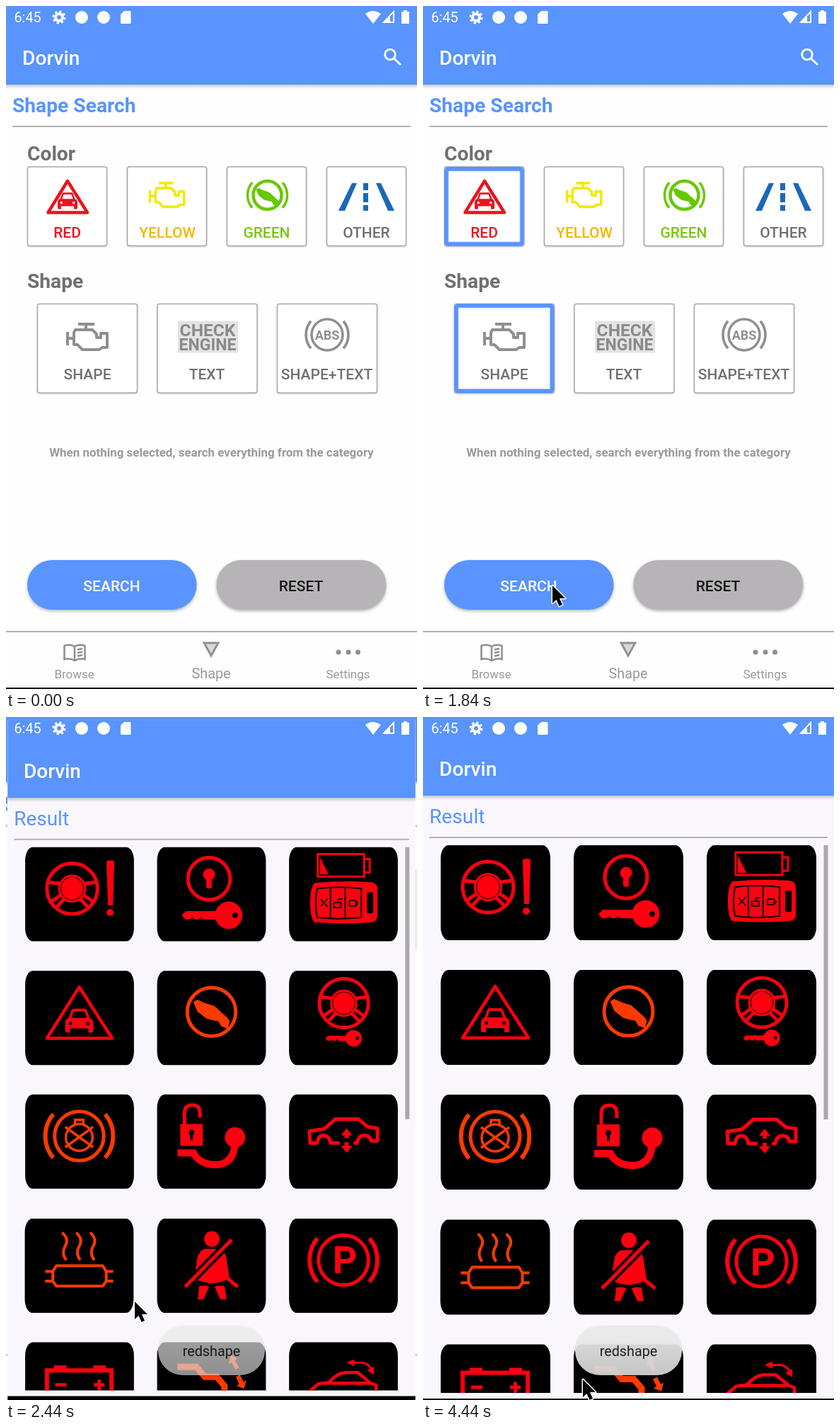
An HTML page that plays this animation: 581x964 px, repeating every 4.48 s.

```html
<!DOCTYPE html>
<html lang="en">
<head>
<meta charset="utf-8">
<title>Shape search</title>
<style>
html, body { margin: 0; width: 100%; height: 100%; overflow: hidden; background: #fefefe; }
svg { display: block; width: 581px; height: 964px; font-family: Roboto, sans-serif; }
.mid { text-anchor: middle; }
.h { font-size: 28.2px; }
.b { font-weight: 700; }
.label { font-size: 21px; font-weight: 500; text-anchor: middle; fill: #707070; }
.small { font-size: 16.94px; }
.line { fill: none; stroke: currentColor; }
.fill { fill: currentColor; }
.red { color: #fe0010; }
.orange { color: #ff3a00; }
.grey { color: #8f8f8f; }
.card { fill: #fff; stroke: #a9a9ab; stroke-width: 1.5; }
.pick { fill: none; stroke: #5994ff; stroke-width: 6; }
.lift { filter: drop-shadow(0 2px 2px rgba(0, 0, 0, .3)); }
.soft { filter: drop-shadow(0 1px 1px rgba(0, 0, 0, .18)); }

.page { transform-origin: 290.5px 516px; }
.page, .pick, #toast, #cursor { animation: 4480ms linear infinite; }
#search { animation-name: leave; }
#result { animation-name: enter, appear; animation-duration: 4480ms; }
#toast { animation-name: toast; }
#cursor { animation-name: travel, show; }
#pickRed { animation-name: pickRed; }
#pickShape { animation-name: pickShape; }

@keyframes leave {
  0%, 50.11% { transform: scale(1); animation-timing-function: cubic-bezier(.3, 0, .8, .15); }
  51.6% { transform: scale(1.02); animation-timing-function: cubic-bezier(.05, .7, .1, 1); }
  59.04%, 100% { transform: scale(1.05); }
}
@keyframes enter {
  0%, 50.11% { transform: scale(.85); animation-timing-function: cubic-bezier(.3, 0, .8, .15); }
  51.6% { transform: scale(.91); animation-timing-function: cubic-bezier(.05, .7, .1, 1); }
  59.04%, 100% { transform: scale(1); }
}
@keyframes appear {
  0%, 51.23% { opacity: 0; }
  53.08%, 100% { opacity: 1; }
}
@keyframes toast {
  0%, 49.1% { opacity: 0; animation-timing-function: cubic-bezier(.333, .667, .667, 1); }
  60.27%, 100% { opacity: 1; }
}
@keyframes pickRed {
  0% { opacity: 0; animation-timing-function: step-end; }
  12.5% { opacity: 1; animation-timing-function: step-end; }
  50%, 100% { opacity: 0; }
}
@keyframes pickShape {
  0% { opacity: 0; animation-timing-function: step-end; }
  27.6% { opacity: 1; animation-timing-function: step-end; }
  50%, 100% { opacity: 0; }
}
@keyframes show {
  0% { opacity: 0; animation-timing-function: step-end; }
  .85%, 100% { opacity: 1; }
}
@keyframes travel {
  0% { transform: translate(11px, 360px); animation-timing-function: ease-out; }
  9%, 14% { transform: translate(92px, 288px); animation-timing-function: ease-in-out; }
  23.5%, 29.5% { transform: translate(114px, 480px); animation-timing-function: ease-in-out; }
  40%, 43% { transform: translate(183px, 818px); }
  50%, 55.5% { transform: translate(182px, 825px); animation-timing-function: ease-in-out; }
  64.2% { transform: translate(220px, 924px); }
  72%, 100% { transform: translate(226px, 935px); }
}
</style>
</head>
<body>
<svg viewBox="0 0 581 964">
<defs>
  <linearGradient id="shade" x2="0" y2="1">
    <stop stop-opacity=".2"/><stop offset="1" stop-opacity="0"/>
  </linearGradient>
  <linearGradient id="toastFill" x2="0" y2="1">
    <stop offset=".3" stop-color="#ebebeb"/><stop offset="1" stop-color="#d6d6d6"/>
  </linearGradient>
  <clipPath id="list"><rect y="175" width="581" height="779"/></clipPath>

  <g id="bar">
    <rect y="111" width="581" height="6" fill="url(#shade)"/>
    <rect width="581" height="111" fill="#5994ff"/>
    <text x="23" y="83" class="h" font-weight="500" fill="#fff">Dorvin</text>
    <path d="M9 170H572" stroke="#b4b2b6" stroke-width="2"/>
  </g>
  <rect id="tile" width="155" height="134" rx="11" ry="19"/>
  <rect id="small" y="227" width="112" height="111.5" rx="3" class="card soft"/>
  <rect id="large" y="420.5" width="141" height="125.5" rx="3" class="card soft"/>

  <g id="engine" class="line" stroke-width="4" stroke-linejoin="round">
    <path d="M18 3H41M29 3V10M14 11H38L44 17V22H50V16H59V36H52L48 39H24L17 32H12V15ZM3 14V33M3 23H12"/>
  </g>
  <g id="car">
    <path class="fill" fill-rule="evenodd" d="M-15-4L-11-15Q-10-17-8-17H8Q10-17 11-15L15-4Q20-2 20 3V15Q20 17 17 17H13V11H-13V17H-17Q-20 17-20 15V3Q-20-2-15-4ZM-11-4H11L8-13H-8ZM-15 4a2.5 2.5 0 1 0 5 0a2.5 2.5 0 1 0-5 0M10 4a2.5 2.5 0 1 0 5 0a2.5 2.5 0 1 0-5 0"/>
  </g>
  <path id="brackets" class="line" stroke-width="6" d="M-37-31A48 48 0 0 0-37 31M37-31A48 48 0 0 1 37 31"/>
  <path id="foot" class="fill" d="M-26-13L-20-16L-9-11L4-7L23 10L26 15L23 25L14 22L10 15L-7 11L-20 1Z"/>
  <g id="wheel">
    <circle r="36" class="line" stroke-width="5"/>
    <circle r="20" class="fill"/>
    <circle r="16.5" fill="none" stroke="#000"/>
    <path class="line" stroke-width="5" d="M-34-9L-17-7M34-9L17-7M-23 27L-11 14M23 27L11 14M-30 19L-16 9M30 19L16 9"/>
  </g>
  <g id="key">
    <circle r="19.5" class="fill"/>
    <circle cx="9" r="4" fill="#000"/>
    <path class="fill" d="M-15-6H-61L-67 0L-62 6H-55L-52 3L-48 6H-43L-40 3L-36 6H-15Z"/>
  </g>
</defs>

<g id="search" class="page">
  <rect width="581" height="1033" fill="#fefefe"/>
  <use href="#bar"/>
  <g fill="none" stroke="#fff" stroke-width="2.8"><circle cx="543" cy="68.5" r="7.3"/><path d="M548.5 74L558 83"/></g>
  <text x="9" y="150" class="h b" fill="#5994ff">Shape Search</text>
  <g class="h b" fill="#707070"><text x="30" y="218">Color</text><text x="30" y="398">Shape</text></g>

  <use href="#small" x="30.5"/><use href="#small" x="171.5"/><use href="#small" x="312.5"/><use href="#small" x="453.5"/>
  <use href="#large" x="44.5"/><use href="#large" x="214"/><use href="#large" x="383.5"/>
  <rect id="pickRed" class="pick" x="33" y="230" width="107" height="106" rx="3"/>
  <rect id="pickShape" class="pick" x="47" y="423" width="135.500" height="120.500" rx="3"/>

  <g color="#e8141f">
    <path class="line" stroke-width="4.5" stroke-linejoin="round" d="M87 247L115 291.500H59.500Z"/>
    <use href="#car" transform="translate(87 275) scale(.7 .69)"/>
  </g>
  <use href="#engine" color="#f3e900" transform="translate(201 247) scale(.86 .93)"/>
  <g color="#66c800" transform="translate(369.500 267)">
    <circle r="20" class="line" stroke-width="4.5"/>
    <use href="#brackets" transform="scale(.58)"/>
    <use href="#foot" transform="scale(.62)"/>
  </g>
  <path fill="#1b68b8" d="M470 289L489 250H496L479 289ZM549 289L530 250H523L540 289ZM505 250h7v10h-7zM505 264h7v13h-7zM505 281h7v8h-7z"/>
  <g class="label">
    <text x="86.500" y="326.500" style="fill:#e8141f">RED</text>
    <text x="228" y="326.500" style="fill:#f5b400">YELLOW</text>
    <text x="368.500" y="326.500" style="fill:#7ac70c">GREEN</text>
    <text x="509.500" y="326.500">OTHER</text>
    <text x="115" y="527">SHAPE</text>
    <text x="284" y="527">TEXT</text>
    <text x="453.500" y="527">SHAPE+TEXT</text>
  </g>
  <use href="#engine" class="grey" x="84" y="446"/>
  <rect x="243" y="444.500" width="85" height="45" fill="#e3e3e3"/>
  <g class="b mid" fill="#8a8a8a"><text x="285" y="465.500" font-size="24.500">CHECK</text><text x="285" y="486" font-size="23">ENGINE</text></g>
  <g class="grey" transform="translate(454 464)">
    <circle r="22" class="line" stroke-width="3.5"/>
    <use href="#brackets" transform="scale(.62)"/>
    <text y="6.500" class="b mid fill" font-size="18">ABS</text>
  </g>

  <text x="290.500" y="636" class="b mid small" fill="#9a9a9c">When nothing selected, search everything from the category</text>
  <rect class="lift" x="30" y="782" width="239.500" height="70" rx="35" fill="#5994ff"/>
  <rect class="lift" x="297.500" y="782" width="240" height="70" rx="35" fill="#b6b4b6"/>
  <text x="149.500" y="825.500" class="label" style="fill:#fff">SEARCH</text>
  <text x="417" y="825.500" class="label" style="fill:#161616">RESET</text>

  <path d="M0 883H581" stroke="#b0b0b0" stroke-width="2"/>
  <g class="grey">
    <path class="line" stroke-width="2.500" d="M97 904Q90 900 82.500 903V922Q90 920 97 924Q104 920 111.500 922V903Q104 900 97 904V924M101 908.500L108 907M101 913L108 911.500M101 917.500L108 916"/>
    <path d="M280 899H300L290 917Z" fill="#d8d8d8" stroke="currentColor" stroke-width="2.800"/>
    <g class="fill"><circle cx="470" cy="912" r="3.500"/><circle cx="484" cy="912" r="3.500"/><circle cx="497.500" cy="912" r="3.500"/></g>
  </g>
  <g class="mid small" fill="#999">
    <text x="96.500" y="948.500">Browse</text><text x="290" y="948.500" font-size="19.770" style="font-size:19.77px">Shape</text><text x="483.500" y="948.500">Settings</text>
  </g>
  <rect y="962" width="581" height="71"/>
</g>

<g id="result" class="page">
  <rect width="581" height="1033" fill="#f9f7fb"/>
  <use href="#bar"/>
  <text x="9" y="150" class="h" fill="#5994ff">Result</text>
  <rect x="566.500" y="181" width="6" height="387" fill="#a9a8ab"/>
  <g clip-path="url(#list)" class="red">
    <g transform="translate(25 181)">
      <use href="#tile"/>
      <use href="#wheel" x="67" y="59"/>
      <path class="fill" d="M116 22Q116 19 119 19H124Q127 19 127 22L125 83H118Z"/><circle cx="121" cy="93" r="5" class="fill"/>
    </g>
    <g transform="translate(213 181)">
      <use href="#tile"/>
      <circle cx="74" cy="45" r="30" class="line" stroke-width="5"/>
      <circle cx="74" cy="39" r="8.500" class="fill"/><path class="fill" d="M70 42H78V57Q74 61 70 57Z"/>
      <use href="#key" x="102" y="97"/>
    </g>
    <g transform="translate(401 181)">
      <use href="#tile"/>
      <path class="line" stroke-width="3" d="M41 10H107V42H41ZM107 17H115V36H107"/>
      <path class="fill" d="M44 14L56 39H44Z"/>
      <path class="fill" d="M36 51Q80 47 117 50Q126 51 126 60V97Q126 106 117 107Q80 110 36 107Q30 100 30 79Q30 58 36 51Z"/>
      <rect x="111" y="64" width="9" height="30" rx="2"/>
      <path fill="none" stroke="#000" stroke-width="2" d="M40 59Q70 55 103 59V100Q70 104 40 100Q36 79 40 59ZM59 57V102M80 57V102"/>
      <path fill="none" stroke="#000" stroke-width="1.500" d="M45 74L55 85M45 84L50 79L55 73M64 79H74V86H64ZM70 79V74H76M86 76H95V84H86ZM95 77Q101 80 95 83"/>
    </g>

    <g transform="translate(25 357)">
      <use href="#tile"/>
      <path class="line" stroke-width="4.500" stroke-linejoin="round" d="M77 23L124 96H31Z"/>
      <use href="#car" x="77" y="71"/>
    </g>
    <g transform="translate(213 357)" class="orange">
      <use href="#tile"/>
      <circle cx="77.500" cy="58.500" r="34.500" class="line" stroke-width="5"/>
      <use href="#foot" x="77.500" y="57"/>
    </g>
    <g transform="translate(401 357)">
      <use href="#tile"/>
      <use href="#wheel" transform="translate(78 46) scale(.97)"/>
      <use href="#key" transform="translate(92 96) scale(.6)"/>
    </g>

    <g transform="translate(25 533)" class="orange">
      <use href="#tile"/>
      <g transform="translate(77 59)">
        <circle r="35" class="line" stroke-width="5"/>
        <use href="#brackets"/>
        <g class="line" stroke-width="3.500"><circle cy="2" r="19"/><path d="M-6-17V-23H6V-17M-20-13L20 16M20-13L-20 16"/></g>
      </g>
    </g>
    <g transform="translate(213 533)">
      <use href="#tile"/>
      <rect x="33" y="42" width="32" height="31" class="fill"/>
      <path class="line" stroke-width="5" d="M39 43V26Q39 15 50 15Q61 15 61 26V33"/>
      <circle cx="49" cy="54" r="4"/><path d="M47 55h4v10h-4z"/>
      <path class="line" stroke-width="10" d="M29 83H52Q60 100 85 100Q111 98 111 66"/>
      <circle cx="111" cy="61" r="14.500" class="fill"/>
    </g>
    <g transform="translate(401 533)">
      <use href="#tile"/>
      <path class="line" stroke-width="5" stroke-linejoin="round" d="M72 69H59Q57 58 49 58Q42 58 40 69H30L29 52L50 49L66 35H99L112 46L126 48V66H117Q115 58 107 58Q99 58 97 69H92"/>
      <path class="fill" d="M82 48L90 58H85V62H79V58H74ZM82 83L74 73H79V68H85V73H90Z"/>
    </g>

    <g transform="translate(24.500 709.500)" class="orange">
      <use href="#tile"/>
      <g class="line" stroke-width="4">
        <path id="wave" d="M53 20Q64 29 57 40Q52 50 59 59"/><use href="#wave" x="20"/><use href="#wave" x="40"/>
        <path stroke-linejoin="round" d="M29 75H40L45 67H111L116 75H126M29 89H40L45 96H111L116 89H126M40 75V89M116 75V89"/>
      </g>
    </g>
    <g transform="translate(213 709.500)">
      <use href="#tile"/>
      <circle cx="78" cy="29" r="11" class="fill"/>
      <path class="fill" d="M68 43H88Q98 45 99 58L103 85Q90 92 78 92Q66 92 53 85L57 58Q59 45 68 43ZM60 96Q70 94 74 97L66 115H58ZM96 96Q86 94 82 97L90 115H99Z"/>
      <path fill="none" stroke="#000" stroke-width="12" d="M107 29L41 96"/>
      <path class="line" stroke-width="5" d="M106 30L40 97M98 83L115 97"/>
    </g>
    <g transform="translate(401 709.500)">
      <use href="#tile"/>
      <g transform="translate(77.500 59)">
        <circle r="35.500" class="line" stroke-width="5"/><use href="#brackets"/>
        <text x="2" y="19" class="b mid fill" font-size="54">P</text>
      </g>
    </g>

    <g transform="translate(25 885.500)">
      <use href="#tile"/>
      <path class="line" stroke-width="6" d="M31 90V40H123V90"/>
      <path class="fill" d="M41 33H59V39H41ZM97 33H115V39H97ZM43 58H59V63H43ZM98 58H113V63H98ZM103 53H108V68H103Z"/>
    </g>
    <g transform="translate(213 885.500)" class="orange">
      <use href="#tile"/>
      <path class="line" stroke-width="9" d="M29 35H56L68 49H85L96 62V80"/>
      <path class="fill" d="M105 18L114 23L111 26L117 36L112 39L106 29L102 31ZM124 66L113 62L117 59L112 49L118 46L123 56L127 54Z"/>
    </g>
    <g transform="translate(401 885.500)">
      <use href="#tile"/>
      <path class="line" stroke-width="4.500" d="M29 70L42 59L57 57Q68 44 80 43H98L116 58L124 61V70M52 58H116"/>
      <path class="line" stroke-width="3" d="M90 29H105Q114 31 118 39"/>
      <path class="fill" d="M82 29L93 24V34ZM121 46L111 40L121 35Z"/>
    </g>
  </g>
  <rect y="962" width="581" height="71"/>
</g>

<g fill="#fff">
  <text x="11.500" y="23" font-size="19.770">6:45</text>
  <g fill="none" stroke="#fff"><circle cx="75" cy="16" r="5" stroke-width="4"/><circle cx="75" cy="16" r="8" stroke-width="3" stroke-dasharray="3.200 3.083"/></g>
  <circle cx="107" cy="16" r="9"/>
  <circle cx="138" cy="16" r="9"/>
  <path d="M167 7H175Q176.500 7 176.500 8.500V23.500Q176.500 25 175 25H163.500Q162 25 162 23.500V12Z"/>
  <path d="M508 11Q519 3 530 11L519 25Z"/>
  <path d="M548 8V23H534Z" fill="none" stroke="#fff" stroke-width="2"/><path d="M532 24L543 13V24Z"/>
  <path d="M562 6H567V8H570V25H559V8H562Z"/>
</g>

<g id="toast">
  <rect class="soft" x="215" y="859" width="151" height="70" rx="35" fill="url(#toastFill)" fill-opacity=".92"/>
  <text x="290.500" y="902" class="mid" font-size="19.770" fill="#202020">redshape</text>
</g>

<path id="cursor" d="M0 0V25L5.500 20L9.500 29L14 27L10 18H18Z" stroke="#fff" stroke-width="3" stroke-linejoin="round" paint-order="stroke"/>
</svg>
</body>
</html>
```
